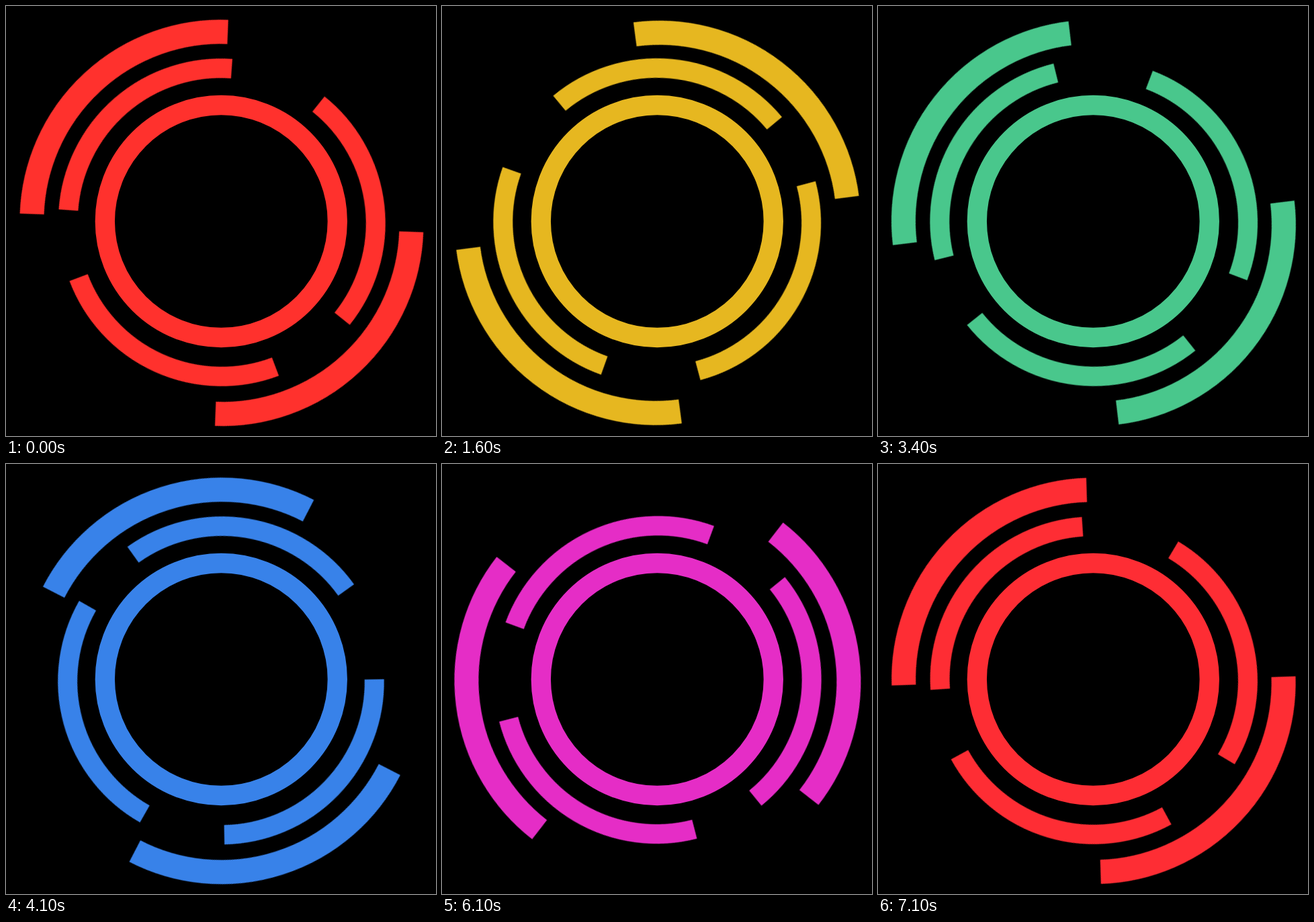
An HTML page that plays this animation: 640 by 640 pixels, repeating every 7.2 s.

```html
<!DOCTYPE html>
<html lang="en">
<head>
<meta charset="utf-8">
<title>Rotating rings</title>
<style>
  html, body { margin: 0; width: 100%; height: 100%; overflow: hidden; background: #000; }
  svg { display: block; width: 100%; height: 100%; fill: none; stroke: #ff312d; }
</style>
</head>
<body>
<svg id="rings" viewBox="0 0 640 640">
  <defs>
    <path id="wide" d="M199 -199A281.4 281.4 0 0 1 199 199" stroke-width="36"/>
    <path id="slim" d="M160.7 -160.7A227.3 227.3 0 0 1 160.7 160.7" stroke-width="29"/>
  </defs>
  <circle cx="320.3" cy="320.5" r="173" stroke-width="29.3"/>
  <g transform="translate(320.7 321.8)">
    <g id="middle">
      <use href="#slim" transform="rotate(229.1) translate(2.1 .4)"/>
      <use href="#slim" transform="rotate(-6.3) translate(2.1 1.8)"/>
      <use href="#slim" transform="rotate(114.35) translate(2.1 -1)"/>
    </g>
  </g>
  <g transform="translate(320.9 322.8)">
    <g id="outer">
      <use href="#wide" transform="rotate(47.1) translate(2.9 1.2)"/>
      <use href="#wide" transform="rotate(227.1) translate(2.9 1.2)"/>
    </g>
  </g>
</svg>
<script>
  const TICK = 100;

  // Loops the keyframes, moving on once per tick.
  function loop(id, frames, ticks) {
    const anim = document.getElementById(id).animate(frames, {
      duration: ticks * TICK,
      easing: `steps(${ticks})`,
      iterations: Infinity
    });
    anim.startTime = 0;
  }

  const spin = deg => [{ transform: 'rotate(0deg)' }, { transform: `rotate(${deg}deg)` }];
  const tint = (stroke, offset) => ({ stroke, offset });

  // Each spin runs slightly past its full or half turn before it restarts.
  loop('middle', spin(362.16), 36);
  loop('outer', spin(181.08), 36);
  loop('rings', [
    tint('rgb(255, 49, 45)', 0),
    tint('rgb(255, 171, 27)', .193),
    tint('rgb(87, 255, 64)', .393),
    tint('rgb(52, 113, 255)', .593),
    tint('rgb(220, 45, 255)', .793),
    tint('rgb(255, 45, 45)', .993),
    tint('rgb(255, 49, 45)', 1)
  ], 72);
</script>
</body>
</html>
```
